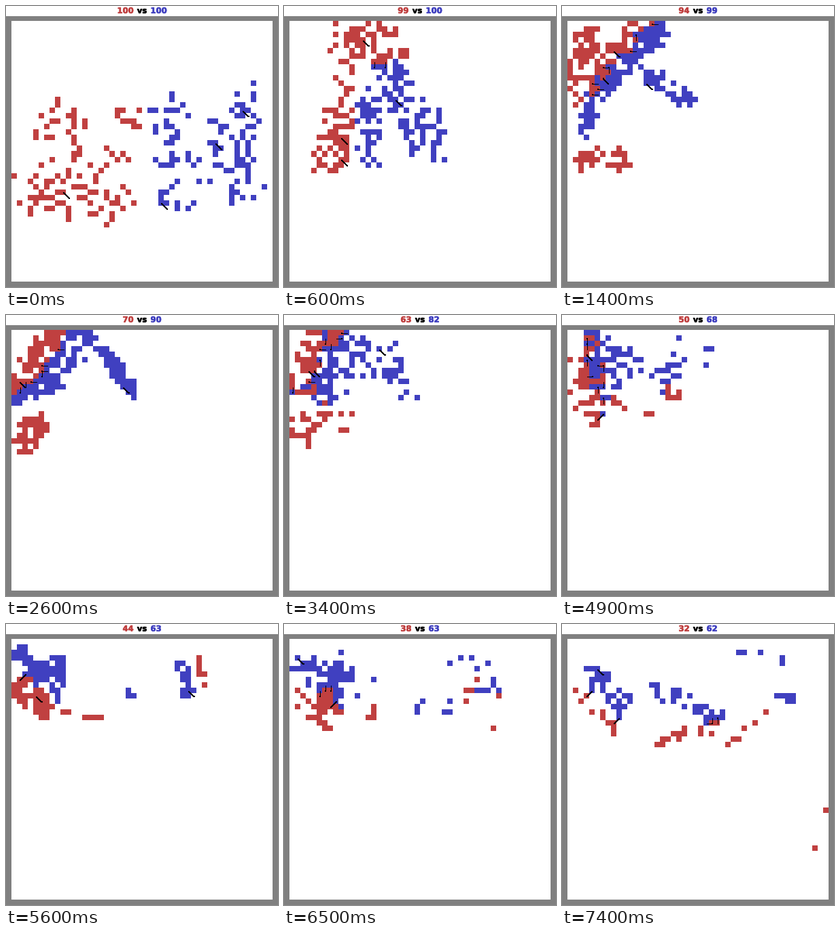
A matplotlib script that plays this animation: 400x415 px, repeating every 7500 ms.

```python
from itertools import combinations, product

import matplotlib.pyplot as plt
import numpy as np
from matplotlib import patheffects
from matplotlib.animation import FuncAnimation
from matplotlib.collections import LineCollection
from matplotlib.patches import Rectangle

W, H, DPI = 400, 415, 100
PX = 72 / DPI
CELL, N, LEFT, TOP = 8, 48, 8, 23
FRAMES, STEP = 75, 100
RED, BLUE = (192 / 255, 64 / 255, 64 / 255), (64 / 255, 64 / 255, 192 / 255)
RUN = 2.5  # cells per frame of a unit that breaks away

rng = np.random.default_rng(7)
rows, cols = np.mgrid[:N, :N]
keys = []


def muster(n, bands, taken):
    """Draw n free cells from bands (c0, r0, c1, r1, half width)."""
    score = np.full((N, N), -np.inf)
    for c0, r0, c1, r1, w in bands:
        dc, dr = c1 - c0, r1 - r0
        u = ((cols - c0) * dc + (rows - r0) * dr) / (dc * dc + dr * dr)
        u = np.clip(u, 0, 1)
        d = np.hypot(cols - c0 - u * dc, rows - r0 - u * dr)
        score = np.maximum(score, -(d / w) ** 4)
    score = score + rng.gumbel(size=score.shape)
    score[taken] = -np.inf
    best = np.argsort(score, axis=None)[-n:]
    taken.flat[best] = True
    return np.column_stack([best % N, best // N]).astype(float)


def key(t, n_red, red, n_blue, blue):
    taken = np.zeros((N, N), bool)
    keys.append((t, muster(n_red, red, taken), muster(n_blue, blue, taken)))


key(0,
    100, [(9, 19, 14, 25, 4.5), (5, 31, 17, 32, 4.5), (21, 16, 20, 24, 2)],
    100, [(29, 15, 30, 31, 3.5), (42, 14, 42, 30, 3.5), (37, 18, 37, 28, 1.5)])
key(6,
    99, [(10, 3, 18, 4, 3), (10, 7, 9, 14, 2), (8, 17, 7, 26, 3)],
    100, [(14, 13, 14, 25, 2), (18, 9, 23, 20, 3), (26, 18, 27, 24, 2)])
key(14,
    94, [(13, 0, 1, 13, 2), (3, 3, 1, 8, 2.5), (2, 25, 9, 25, 2)],
    99, [(16, 1, 6, 12, 2.2), (4, 13, 3, 20, 1.3), (15, 10, 22, 14, 1.5)])
key(26,
    70, [(7, 1, 1, 9, 2.2), (4, 17, 2, 20, 2)],
    90, [(12, 1, 6, 9, 2.5), (6, 10, 1, 12, 1.2), (16, 3, 22, 11, 1.2)])
key(42,
    55, [(3, 0, 3, 11, 1.6), (6, 15, 1, 17, 1.5), (18, 11, 13, 15, 1)],
    73, [(7, 0, 7, 13, 1.5), (11, 3, 13, 8, 1.6), (20, 3, 18, 9, 1)])
key(56,
    44, [(1, 8, 5, 12, 2), (34, 3, 35, 8, 0.6), (8, 13, 16, 14, 0.5)],
    63, [(1, 3, 5, 6, 2), (8, 4, 8, 9, 1.6), (31, 4, 32, 10, 1.1),
         (20, 9, 25, 11, 0.6)])
key(74,
    32, [(17, 18, 26, 16, 1.4), (1, 9, 9, 17, 0.8), (28, 20, 36, 13, 0.5),
         (44, 42, 47, 31, 0.1)],
    62, [(4, 6, 10, 12, 1.8), (16, 9, 27, 14, 1.6), (31, 2, 40, 4, 0.8),
         (38, 10, 41, 11, 1), (43, 40, 46, 30, 0.1)])


def near(c, r, reach):
    """Cells around (c, r), closest first."""
    span = range(-reach, reach + 1)
    offsets = sorted(product(span, span), key=lambda d: d[0] ** 2 + d[1] ** 2)
    return [(c + x, r + y) for x, y in offsets
            if 0 <= c + x < N and 0 <= r + y < N]


def pair(a, b):
    """For each place in b, the unit of a that should walk there."""
    cost = ((a[:, None] - b) ** 2).sum(2)
    pick, used = {}, set()
    for flat in np.argsort(cost, axis=None):
        i, j = divmod(int(flat), len(b))
        if i not in used and j not in pick:
            pick[j] = i
            used.add(i)
    for _ in range(4):
        for j, k in combinations(range(len(b)), 2):
            p, q = pick[j], pick[k]
            if cost[p, j] + cost[q, k] > cost[p, k] + cost[q, j]:
                pick[j], pick[k] = q, p
    return [pick[j] for j in range(len(b))]


class Leg:
    """One team's march between two key formations."""

    def __init__(self, t0, t1, a, b):
        alive = pair(a, b)
        lost = [i for i in range(len(a)) if i not in set(alive)]
        drift = (b - a[alive]).mean(0)
        self.t0, self.t1 = t0, t1
        self.p = np.vstack([a[alive], a[lost]])
        self.q = np.vstack([b, a[lost] + drift])
        self.sway = rng.normal(0, 0.8, self.p.shape)
        death = t0 + (np.arange(len(lost)) + 1) / max(len(lost), 1) * (t1 - t0)
        self.end = np.append(np.full(len(b), np.inf), death)
        dist = np.hypot(*(self.q - self.p).T)
        self.start = np.where(dist > 12, np.maximum(t0, t1 - dist / RUN), t0)

    def at(self, t):
        u = np.clip((t - self.start) / (self.t1 - self.start), 0, 1)[:, None]
        v = np.sin(np.pi * (t - self.t0) / (self.t1 - self.t0))
        pos = self.p + (self.q - self.p) * u + self.sway * v
        if t > self.t0:
            pos += rng.normal(0, 0.3, pos.shape)
        return np.clip(np.rint(pos[self.end > t]), 0, N - 1)


def settle(units, taken):
    cells = []
    for c, r in units:
        cell = next(p for p in near(int(c), int(r), 8) if p not in taken)
        taken.add(cell)
        cells.append(cell)
    return cells


def strikes(red, blue):
    """Blows at neighbouring enemies, and a few at empty air."""
    hits = []
    for own, foes in ((red, set(blue)), (blue, set(red))):
        for c, r in own:
            close = [p for p in near(c, r, 1) if p in foes]
            roll = rng.random()
            if close and roll < 0.25:
                hits.append(((c, r), close[0]))
            elif roll < 0.015:
                hits.append(((c, r), near(c, r, 1)[-1]))
    order = rng.permutation(len(hits))[:11]
    return [hits[i] for i in order]


def play():
    scenes = []
    for (t0, r0, b0), (t1, r1, b1) in zip(keys, keys[1:]):
        legs = Leg(t0, t1, r0, r1), Leg(t0, t1, b0, b1)
        for t in range(t0, t1):
            taken = set()
            scenes.append([settle(leg.at(t), taken) for leg in legs])
    taken = set()
    scenes.append([settle(team, taken) for team in keys[-1][1:]])
    return [(red, blue, strikes(red, blue)) for red, blue in scenes]


scenes = play()

fig = plt.figure(figsize=(W / DPI, H / DPI), dpi=DPI, facecolor="white")
ax = fig.add_axes([0, 0, 1, 1])
ax.axis("off")
ax.add_patch(Rectangle((0, 15), W, 400, fc="#808080", lw=0))
field = ax.imshow(np.ones((N, N, 3)), interpolation="nearest", zorder=2,
                  extent=(LEFT, LEFT + N * CELL, TOP + N * CELL, TOP))
ax.set(xlim=(0, W), ylim=(H, 0), aspect="auto")
arms = LineCollection([], colors="black", linewidths=PX, antialiaseds=False,
                      zorder=3)
ax.add_collection(arms)
tips, = ax.plot([], [], "s", color="black", ms=2 * PX, mew=0, zorder=4)


def label(color, ha):
    edge = patheffects.withStroke(linewidth=0.6 * PX, foreground=color)
    return ax.text(0, 10.6, "", color=color, ha=ha, va="baseline",
                   family="DejaVu Sans", weight="bold", size=11.6 * PX,
                   path_effects=[edge])


left, mid, right = label(RED, "right"), label("black", "center"), label(BLUE, "left")
mid.set_text("vs")


def centre(cell):
    return (LEFT + CELL * cell[0] + 4.5, TOP + CELL * cell[1] + 4.5)


def draw(t):
    red, blue, hits = scenes[t]
    img = np.ones((N, N, 3))
    for team, color in ((red, RED), (blue, BLUE)):
        for c, r in team:
            img[r, c] = color
    field.set_data(img)
    arms.set_segments([(centre(a), centre(b)) for a, b in hits])
    ends = [centre(b) for _, b in hits]
    tips.set_data([x for x, _ in ends], [y for _, y in ends])

    n_red, n_blue = str(len(red)), str(len(blue))
    x = W / 2 + 4 * (len(n_red) - len(n_blue))
    left.set_text(n_red)
    right.set_text(n_blue)
    for text, dx in ((left, -12.5), (mid, 0), (right, 12.5)):
        text.set_x(x + dx)
    return field, arms, tips, left, mid, right


anim = FuncAnimation(fig, draw, frames=FRAMES, interval=STEP, repeat=True,
                     repeat_delay=0, blit=False)
plt.show()
```
